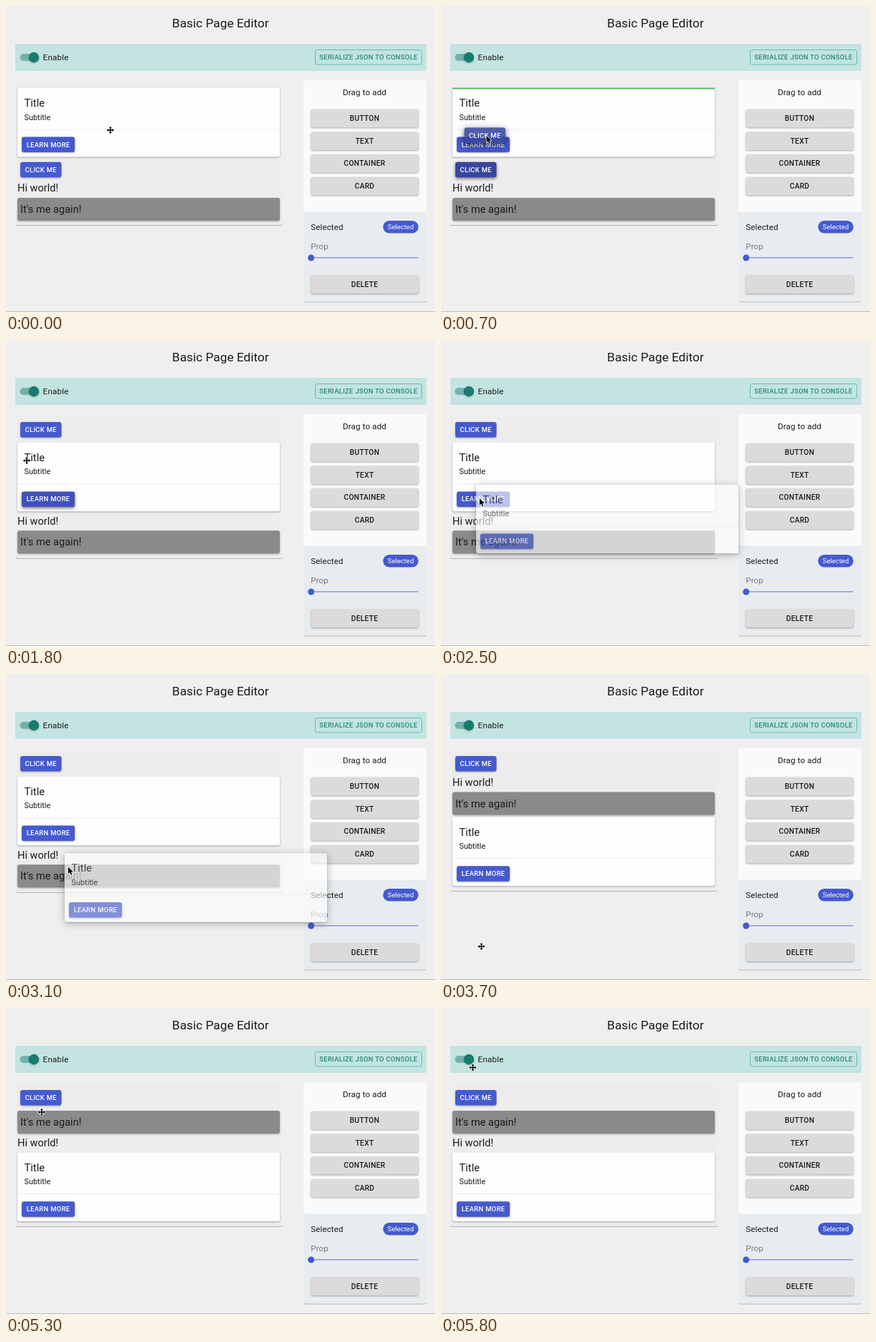
Recreate the animation shown at these times as an HTML page. Size 600 px wide and 429 px high, loop 5900 ms.

```html
<!DOCTYPE html>
<html lang="en">
<head>
<meta charset="utf-8">
<title>Basic Page Editor</title>
<style>
  html, body { margin: 0; width: 100%; height: 100%; overflow: hidden; background: #f0eff0; }
  svg { display: block; width: 100vw; height: 100vh; }
  text { font-family: Roboto, Arial, sans-serif; fill: #1b1b1c; white-space: pre; }
  .btn { font-weight: 500; letter-spacing: .02857em; text-anchor: middle; }
  .paper { filter: drop-shadow(0 1px .7px rgba(0,0,0,.24)); }
  .raised { filter: drop-shadow(0 1px .8px rgba(0,0,0,.32)); }
  .hover { filter: drop-shadow(0 2px 2px rgba(0,0,0,.5)); }
  .lifted { filter: drop-shadow(0 2px 6px rgba(0,0,0,.4)); }
</style>
</head>
<body>
<svg viewBox="0 0 600 429" xmlns="http://www.w3.org/2000/svg">
  <g id="page"></g>
  <g id="live"></g>
</svg>
<script>
const LOOP = 5900, STEP = 100;
const PRIMARY = '#455acf', DARK = '#3747a0', GREEN = '#52b556';

const rect = (x, y, w, h, fill, r = 0, extra = '') =>
  `<rect x="${x}" y="${y}" width="${w}" height="${h}" rx="${r}" fill="${fill}" ${extra}/>`;
const label = (x, y, size, str, extra = '') =>
  `<text x="${x}" y="${y}" font-size="${size}" ${extra}>${str}</text>`;
const at = (x, y, body) => `<g transform="translate(${x} ${y})">${body}</g>`;

const primaryButton = (x, y, w, str, fill = PRIMARY) =>
  rect(x, y, w, 21.5, fill, 3, `class="${fill === PRIMARY ? 'raised' : 'hover'}"`) +
  label(x + w / 2, y + 14, 9.5, str, 'class="btn" style="fill:#fff"');
const greyButton = (y, str) =>
  rect(426.5, y, 150.5, 25.5, '#dcdada', 3, 'class="raised"') +
  label(501.5, y + 16.2, 10.2, str, 'class="btn"');

// Each block draws itself from its own top edge.
const blocks = {
  button: fill => primaryButton(20, 0, 57.5, 'CLICK ME', fill),
  text: () => label(16, 13, 14.6, 'Hi world!'),
  box: () => rect(16, 0, 367, 32, '#8b8a8b', 3, 'class="raised"') +
    label(20, 21, 14.6, 'It\'s me again!'),
  card: fill => rect(16, 0, 367, 96.5, '#fefefe', 3, 'class="raised"') +
    label(25.5, 26, 14.7, 'Title') +
    label(25.5, 44.6, 10.9, 'Subtitle') +
    rect(16, 57.6, 367, .8, '#e9e9e9') +
    primaryButton(22, 68.6, 74.2, 'LEARN MORE', fill)
};

const layouts = [
  { from: 0, bottom: 307, card: 115, button: 218.7, text: 247, box: 269 },
  { from: 1400, bottom: 306, button: 115, card: 143.8, text: 246, box: 267.3 },
  { from: 3400, bottom: 304, button: 115, text: 144, box: 165.5, card: 200.6 },
  { from: 5300, bottom: 306, button: 115, box: 144, text: 181, card: 202.6 }
];

const drags = [
  { from: 500, to: 1400, block: 'button', grab: [51, 230], alpha: .88, fill: DARK },
  { from: 2000, to: 3400, block: 'card', grab: [21, 163], alpha: .64, fill: PRIMARY },
  { from: 4400, to: 5300, block: 'box', grab: [24, 160.5], alpha: .45 }
];

// Drop indicators: time span and line position.
const markers = [
  [700, 1400, 115], [2100, 2500, 144], [3200, 3400, 298],
  [4500, 5100, 165.3], [5100, 5300, 144]
];

// Pointer path: time, x, y.
const path = [
  [0, 146, 174], [400, 52, 229], [500, 51, 230], [800, 68, 165], [1200, 105, 49.5],
  [1400, 62, 112], [1650, 45, 214], [1800, 29, 169], [2000, 21, 163], [2500, 54, 222],
  [3100, 87, 270.5], [3400, 74, 300], [3700, 56.5, 382], [4100, 34, 240],
  [4400, 24, 166], [4700, 40, 150], [5000, 56, 121], [5300, 50, 146], [5800, 44.5, 83.5]
];

function pointer(t) {
  const i = path.findIndex(p => p[0] > t);
  if (i < 0) return path[path.length - 1].slice(1);
  const [a, b] = [path[i - 1], path[i]];
  const u = (t - a[0]) / (b[0] - a[0]), e = u * u * (3 - 2 * u);
  return [a[1] + (b[1] - a[1]) * e, a[2] + (b[2] - a[2]) * e];
}

const outline = 'fill="#000" stroke="#fff" stroke-width="1.4" paint-order="stroke" stroke-linejoin="round"';
const arrowCursor = `<path d="M0 0V9.6L2.2 7.6 3.8 11.2 5.4 10.5 3.9 7H7Z" ${outline}/>`;
const moveCursor = `<path d="M0 -5L2.2 -2.8H.7V-.7H2.8V-2.2L5 0 2.8 2.2V.7H.7V2.8H2.2L0 5 -2.2 2.8H-.7V.7H-2.8V2.2L-5 0 -2.8 -2.2V-.7H-.7V-2.8H-2.2Z" ${outline}/>`;

document.getElementById('page').innerHTML =
  rect(0, 0, 600, 429, '#f0eff0') +
  rect(0, 428, 600, 1, '#bdbdbd') +
  label(300, 29.5, 17.35, 'Basic Page Editor', 'text-anchor="middle"') +
  rect(13, 53, 575, 38, '#c3e4e1') +
  rect(19.5, 67, 25, 10, '#73b1aa', 5) +
  '<circle cx="39" cy="72" r="7.2" fill="#167b70" class="raised"/>' +
  label(51.6, 75.6, 11.7, 'Enable', 'letter-spacing=".15"') +
  rect(432.5, 61.5, 149, 20.5, 'none', 3, 'stroke="#65b2a9" stroke-width=".9"') +
  label(507, 75, 9.5, 'SERIALIZE JSON TO CONSOLE', 'class="btn" style="fill:#27897d"') +
  rect(416, 104, 172, 310.5, '#e9ecee', 3, 'class="paper"') +
  rect(416, 104, 172, 184.5, '#f8fafb', 2) +
  label(501.5, 125.3, 11.7, 'Drag to add', 'text-anchor="middle" letter-spacing=".1"') +
  ['BUTTON', 'TEXT', 'CONTAINER', 'CARD'].map((s, i) => greyButton(144.7 + i * 31.7, s)).join('') +
  label(426.3, 313.6, 11.7, 'Selected', 'letter-spacing=".05"') +
  rect(527.3, 301, 49.5, 17.5, PRIMARY, 8.75) +
  label(552, 313.1, 9.5, 'Selected', 'text-anchor="middle" style="fill:#fff"') +
  label(426.3, 341, 11.7, 'Prop', 'style="fill:#767879"') +
  rect(426.5, 352.3, 150, 1.2, '#7382dc') +
  `<circle cx="426.7" cy="353" r="4.5" fill="${PRIMARY}"/>` +
  greyButton(377.4, 'DELETE');

const live = document.getElementById('live');

function draw(t) {
  const layout = layouts.filter(l => l.from <= t).pop();
  const drag = drags.find(d => t >= d.from && t < d.to);
  const marker = markers.find(m => t >= m[0] && t < m[1]);
  const [x, y] = pointer(t);
  const fills = {
    button: t >= 400 && t < 1400 ? DARK : PRIMARY,
    card: t >= 1600 && t < 1900 ? '#4051b9' : PRIMARY
  };
  let out = rect(13, 107, 374, layout.bottom - 107, '#ededed', 3, 'class="paper"');
  for (const name in blocks) out += at(0, layout[name], blocks[name](fills[name]));
  if (marker) out += rect(16, marker[2] - .3, 367, 1.8, GREEN);
  if (drag) {
    const [gx, gy] = drag.grab;
    out += `<g opacity="${drag.alpha}" class="lifted">` +
      at(x - gx, y - gy + layout[drag.block], blocks[drag.block](drag.fill)) + '</g>';
  }
  live.innerHTML = out + at(x, y, drag ? arrowCursor : moveCursor);
}

const start = performance.now();
let shown = -1;
function tick() {
  const t = Math.floor((performance.now() - start) % LOOP / STEP) * STEP;
  if (t !== shown) draw(shown = t);
  requestAnimationFrame(tick);
}
tick();
</script>
</body>
</html>
```
